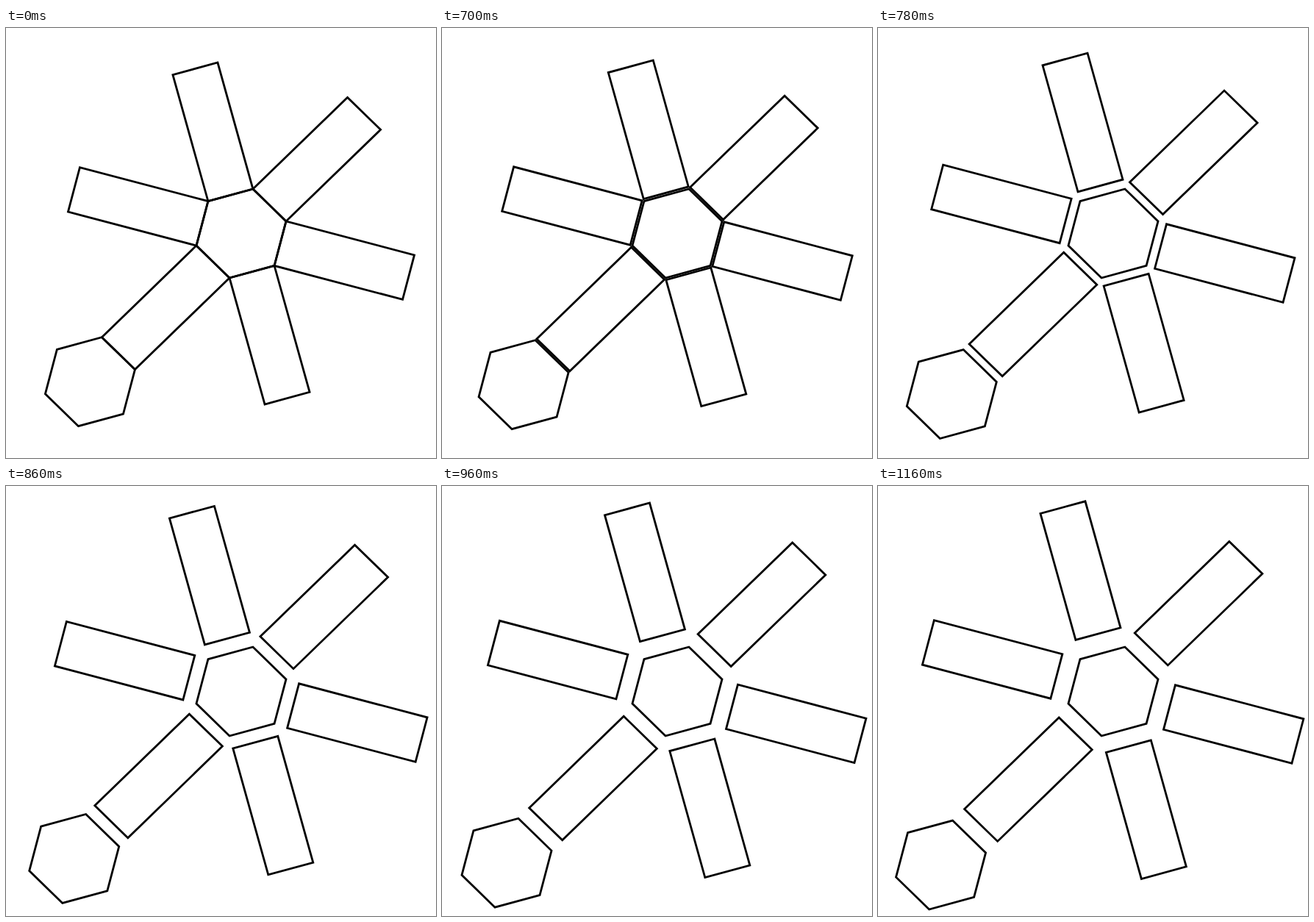
Write an HTML page that moves like this. It is 585 px wide and 585 px high and loops after 3 s.

```html
<!DOCTYPE html>
<html lang="en">
<head>
<meta charset="utf-8">
<title>Hexagon net</title>
<style>
  html, body { margin: 0; width: 100%; height: 100%; overflow: hidden; background: #fff; }
  svg { display: block; width: 100%; height: 100%; }
  polygon { fill: none; stroke: #000; stroke-width: 2.8; }
</style>
</head>
<body>
<svg id="net" viewBox="0 0 585 585"></svg>
<script>
const LOOP = 3000, START = 640, LENGTH = 500, STEP = 20;
const CENTER = [320, 279.5], RADIUS = [63.3, 62.5], TILT = -135.4;
const LID_SIDE = 4;   // side whose arm carries the second hexagon
const LID_GAP = 0.125; // extra lid travel, as a share of the arm

// Arms on opposite sides mirror each other, so three directions are enough.
const spokes = [[-48, -172], [128.6, -124.6], [174.5, 46]];
const drifts = [[-6, -26.2], [13.3, -19], [23.4, 7.9], [6.3, 22.5], [-12.8, 18.8], [-24.1, -6.9]];

const net = document.getElementById('net');
const pieces = [];

const add = (a, b, k = 1) => [a[0] + b[0] * k, a[1] + b[1] * k];

function corner(i) {
  const angle = (TILT + 60 * i) * Math.PI / 180;
  return [CENTER[0] + RADIUS[0] * Math.cos(angle), CENTER[1] + RADIUS[1] * Math.sin(angle)];
}

function addPiece(points, drift) {
  const el = document.createElementNS(net.namespaceURI, 'polygon');
  el.setAttribute('points', points.join(' '));
  net.append(el);
  pieces.push({ el, drift });
}

const hexagon = drifts.map((_, i) => corner(i));
addPiece(hexagon, [0, 0]);

drifts.forEach((drift, i) => {
  const a = corner(i), b = corner(i + 1);
  const arm = add([0, 0], spokes[i % 3], i < 3 ? 1 : -1);
  addPiece([a, b, add(b, arm), add(a, arm)], drift);

  if (i === LID_SIDE) {
    // Two half-heights of hexagon plus the arm separate the centres.
    const offset = add(add(add(a, b), CENTER, -2), arm);
    addPiece(hexagon.map(p => add(p, offset)), add(drift, arm, LID_GAP));
  }
});

const bezier = (a, b, t) =>
  3 * a * t * (1 - t) ** 2 + 3 * b * t * t * (1 - t) + t ** 3;

// Same curve as cubic-bezier(.25, .05, .2, 1)
function ease(x) {
  if (x <= 0) return 0;
  if (x >= 1) return 1;
  let low = 0, high = 1;
  for (let i = 0; i < 24; i++) {
    const mid = (low + high) / 2;
    if (bezier(0.25, 0.2, mid) < x) low = mid; else high = mid;
  }
  return bezier(0.05, 1, low);
}

const origin = performance.now();

function draw() {
  const elapsed = (performance.now() - origin) % LOOP;
  const time = Math.floor(elapsed / STEP) * STEP;
  const p = ease((time - START) / LENGTH);
  for (const { el, drift: [x, y] } of pieces) {
    el.setAttribute('transform', `translate(${x * p} ${y * p})`);
  }
  requestAnimationFrame(draw);
}
draw();
</script>
</body>
</html>
```
